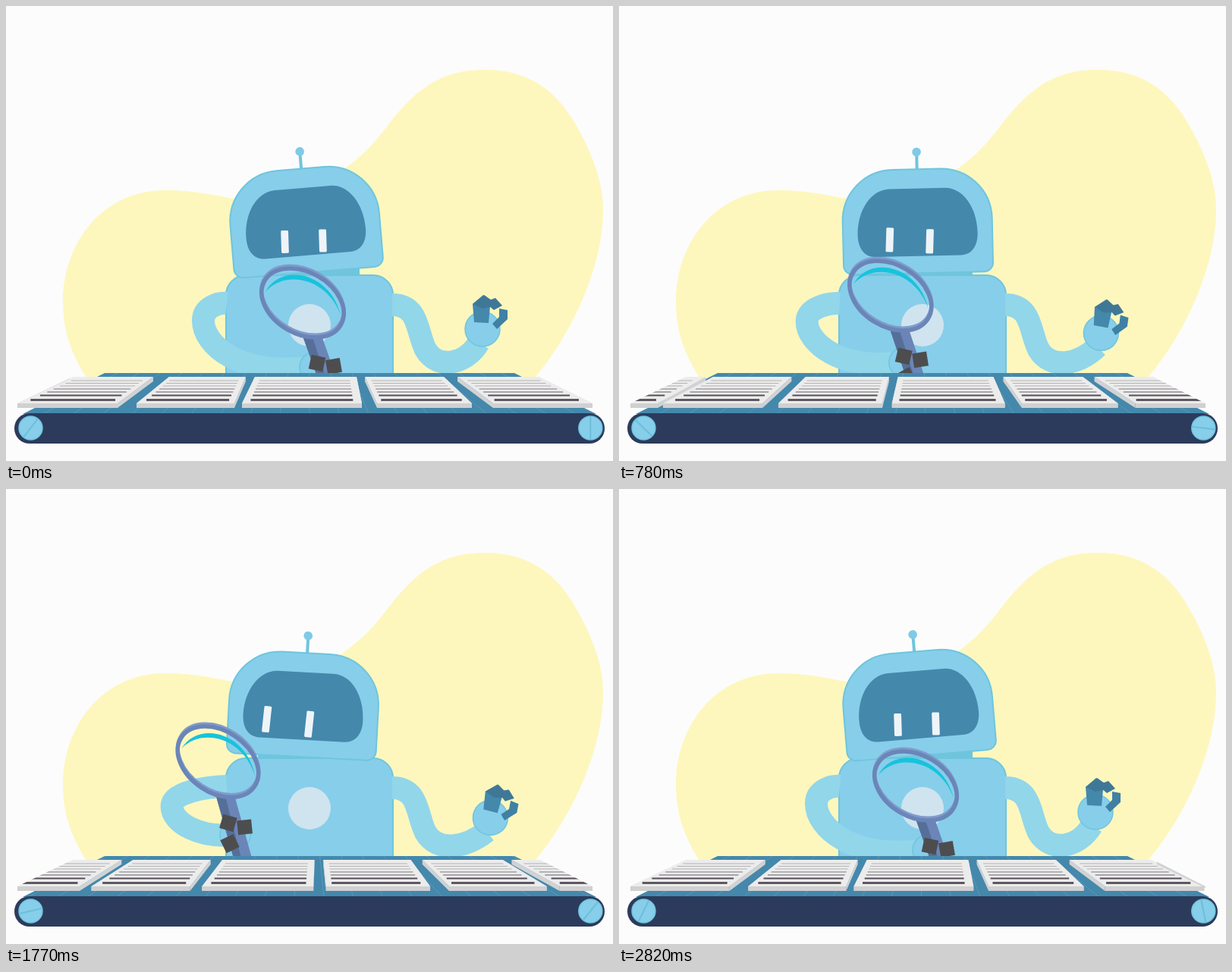
An HTML page with a canvas for the animation above (2850 ms loop, 800x600 px).

```html
<!DOCTYPE html>
<html lang="en">
<head>
<meta charset="utf-8">
<title>Robot inspector</title>
<style>
html, body { margin: 0; width: 100%; height: 100%; overflow: hidden; background: #fcfcfc; }
canvas { display: block; width: 800px; height: 600px; }
</style>
</head>
<body>
<canvas id="stage" width="800" height="600"></canvas>
<script>
const ctx = document.getElementById('stage').getContext('2d');
const LOOP = 2850, STEP = 30;
const SKY = '#87ceea', EDGE = '#6fc5dd', ARM = '#92d6ea', STEEL = '#4488ac', NAVY = '#2c3b5c';
const rad = d => d * Math.PI / 180;
const mix = (a, b, k) => a + (b - a) * k;
const ease = k => (1 - Math.cos(Math.PI * Math.min(1, Math.max(0, k)))) / 2;

// Paper corner x at successive stations along the belt
const PAPER = {
  backL: [-35, 90, 215, 328, 473, 595, 710],
  backR: [84, 194, 316, 462, 577, 702, 827],
  frontL: [-142, 15, 172, 311, 489, 642, 783],
  frontR: [15, 147, 301, 469, 614, 773, 932]
};
const BACK_Y = 489, FRONT_Y = 524, THICK = 6;

function paint(fill, stroke, width = 2) {
  if (fill) { ctx.fillStyle = fill; ctx.fill(); }
  if (stroke) { ctx.strokeStyle = stroke; ctx.lineWidth = width; ctx.stroke(); }
}

function poly(fill, ...pts) {
  ctx.beginPath();
  for (let i = 0; i < pts.length; i += 2) ctx.lineTo(pts[i], pts[i + 1]);
  ctx.closePath();
  paint(fill);
}

function shape(d, fill, stroke, width) {
  const p = new Path2D(d);
  if (fill) { ctx.fillStyle = fill; ctx.fill(p); }
  if (stroke) { ctx.strokeStyle = stroke; ctx.lineWidth = width; ctx.stroke(p); }
}

function disc(x, y, r, fill, stroke, width) {
  ctx.beginPath();
  ctx.arc(x, y, r, 0, 7);
  paint(fill, stroke, width);
}

function box(x, y, w, h, r, fill, stroke) {
  ctx.beginPath();
  ctx.roundRect(x, y, w, h, r);
  paint(fill, stroke);
}

// Draw in a frame moved to (x, y) and turned by deg
function placed(x, y, deg, draw) {
  ctx.save();
  ctx.translate(x, y);
  ctx.rotate(rad(deg));
  draw();
  ctx.restore();
}

function background() {
  ctx.fillStyle = '#fcfcfc';
  ctx.fillRect(0, 0, 800, 600);
  shape('M106 490C84 455 75 425 75 390C75 315 125 243 210 243C250 243 275 250 300 254' +
    'C370 264 440 230 485 180C515 147 545 84 630 84C690 84 725 112 750 155' +
    'C775 198 787 235 787 268C787 350 740 440 697 490Z', '#fdf7bd');
}

function body() {
  ctx.fillStyle = EDGE;
  ctx.fillRect(332, 325, 134, 35);
  box(290, 355, 220, 150, [26, 26, 0, 0], SKY, EDGE);
  disc(400, 421, 28, '#cfe4ee');
}

function rightArm(k) {
  const x = mix(628, 640.5, k), y = mix(426, 435, k);
  shape(`M509 394C545 394 541 430 553 453C568 479 605 474 ${x - 5} ${y + 18}`, null, ARM, 30);
  disc(x, y, 23, SKY, EDGE, 1.5);
  placed(x, y, 13 * k, () => {
    poly(STEEL, -13, -33, 1, -45, 10, -30, 8, -8, -11, -9);
    poly('#3f7897', -13, -33, 2, -45, 12, -38, 10, -29, 0, -27);
    poly('#3f7897', 9, -38, 17, -41, 26, -31, 15, -25, 8, -31);
    poly('#4080a4', 22, -27, 33, -25, 33, -13, 19, 0, 13, -7, 22, -16);
  });
}

function eye(x, y, h) {
  placed(x, y, 3, () => box(-4.9, -h / 2, 9.8, h, 1.5, '#eef4f8'));
}

function head(k) {
  placed(380, 273, mix(-4.8, 5.4, k), () => {
    ctx.translate(-380, -273);
    shape('M394 216L394 196', null, EDGE, 4);
    disc(393.9, 192.8, 5.8, '#7fcae7');
    box(294.5, 215.5, 197, 137, [67, 67, 12, 12], SKY, EDGE);
    shape('M314 301C314 268 333 241 357 241L430 241C454 241 472 268 472 301' +
      'C472 318 464 330 449 330L337 330C322 330 314 318 314 301Z', STEEL);
    const h = mix(30, 36, k);
    eye(mix(364.4, 339.9, k), mix(309.8, 304.2, k), h);
    eye(mix(414.3, 398, k), mix(312.5, 308, k), h);
  });
}

function leftArm(k) {
  const at = (a, b) => mix(a, b, k);
  const ex = at(260, 213), hx = at(405, 286), hy = at(476, 453);
  shape(`M291 392C${at(280, 262)} ${at(391, 393)} ${ex} ${at(397, 400)} ${ex} ${at(415, 419)}` +
    `C${ex} ${at(445, 440)} ${at(305, 250)} ${at(490, 457)} ${hx} ${hy}`, null, ARM, 30);
  disc(hx + 2, hy, 20, SKY, EDGE, 1.5);
}

function ring(y, color, width) {
  ctx.beginPath();
  ctx.ellipse(0, y, 58, 40.5, rad(30), 0, 7);
  paint(null, color, width);
}

function magnifier(k) {
  placed(mix(391, 264.5, k), mix(391, 355, k), 4.5 * k, () => {
    poly('#6b85b8', 1, 47, 25, 44, 54, 126, 30, 128);
    poly('#566f98', 1, 47, 13, 46, 40, 127, 30, 128);
    ring(-2.5, '#7f9ccb', 5);
    ring(0.5, '#6b85b8', 5.5);
    shape('M-49-14C-30-52 35-42 50 16C32-33-24-44-49-14Z', '#17c3dc');
    for (const [x, y, a] of [[23, 107, -30], [19, 80, 12], [41, 84, -10]])
      placed(x, y, a, () => box(-9.5, -9.5, 19, 19, 0, '#4d4d4f'));
  });
}

function paper(pos) {
  const i = Math.floor(pos), f = pos - i;
  const at = a => mix(a[i], a[i + 1], f);
  const bl = at(PAPER.backL), br = at(PAPER.backR), fl = at(PAPER.frontL), fr = at(PAPER.frontR);
  const side = (b, e) => poly('#d2d2d3', b, BACK_Y, e, FRONT_Y, e, FRONT_Y + THICK, b, BACK_Y + THICK);
  side(bl, fl);
  side(br, fr);
  poly('#ececec', bl, BACK_Y, br, BACK_Y, fr, FRONT_Y, fl, FRONT_Y);
  poly('#d0d0d1', fl, FRONT_Y, fr, FRONT_Y, fr, FRONT_Y + THICK, fl, FRONT_Y + THICK);
  [494, 497.5, 501, 505, 509, 513.5, 519.5].forEach((y, n) => {
    const v = (y - BACK_Y) / (FRONT_Y - BACK_Y);
    const l = mix(bl, fl, v), r = mix(br, fr, v);
    ctx.fillStyle = n > 4 ? '#574f57' : n > 2 ? '#969598' : '#b3b3b5';
    const h = [1, 1, 1, 1.3, 1.6, 2, 2.8][n];
    ctx.fillRect(mix(l, r, 0.06), y - h / 2, (r - l) * 0.87, h);
  });
}

function wheel(x, deg) {
  disc(x, 556.5, 15.5, SKY, EDGE, 1.5);
  placed(x, 556.5, deg, () => shape('M-15 0L15 0', null, '#6bbfdb', 2));
}

function belt(t) {
  const k = t / LOOP;
  poly(STEEL, 130, 484, 670, 484, 778, 538, 22, 538);
  ctx.save();
  ctx.beginPath();
  ctx.moveTo(130, 484); ctx.lineTo(670, 484); ctx.lineTo(778, 538); ctx.lineTo(22, 538);
  ctx.clip();
  for (let i = -11; i < 11; i++) {
    const x = (i + 4 * k % 1) * 39;
    shape(`M${400 + x * 0.72} 484L${400 + x} 538`, null, 'rgba(255,255,255,.12)', 1);
  }
  ctx.restore();

  ctx.save();
  ctx.beginPath();
  ctx.moveTo(15, 524); ctx.lineTo(90, 488); ctx.lineTo(702, 488);
  ctx.lineTo(773, 524); ctx.lineTo(773, 531); ctx.lineTo(15, 531);
  ctx.clip();
  for (let i = 0; i < 6; i++) paper(i + k);
  ctx.restore();

  box(11, 537, 778, 40, 20, NAVY);
  wheel(32.5, 128 + 0.1235 * t);
  wheel(770.3, 90 + 0.1235 * t);
}

const TURN = 2280, HOME = 2820;
function draw(now) {
  const t = Math.floor((now % LOOP) / STEP) * STEP;
  const back = (HOME - t) / (HOME - TURN);
  const sweep = ease(t < TURN ? t / TURN : back);
  const tilt = Math.max(0, t < TURN ? t / TURN : back);
  const wave = ease(t < 1395 ? t / 1395 : (2790 - t) / 1395);
  background();
  body();
  rightArm(wave);
  head(tilt);
  leftArm(sweep);
  magnifier(sweep);
  belt(t);
}

const start = performance.now();
function tick() {
  draw(performance.now() - start);
  requestAnimationFrame(tick);
}
tick();
</script>
</body>
</html>
```
